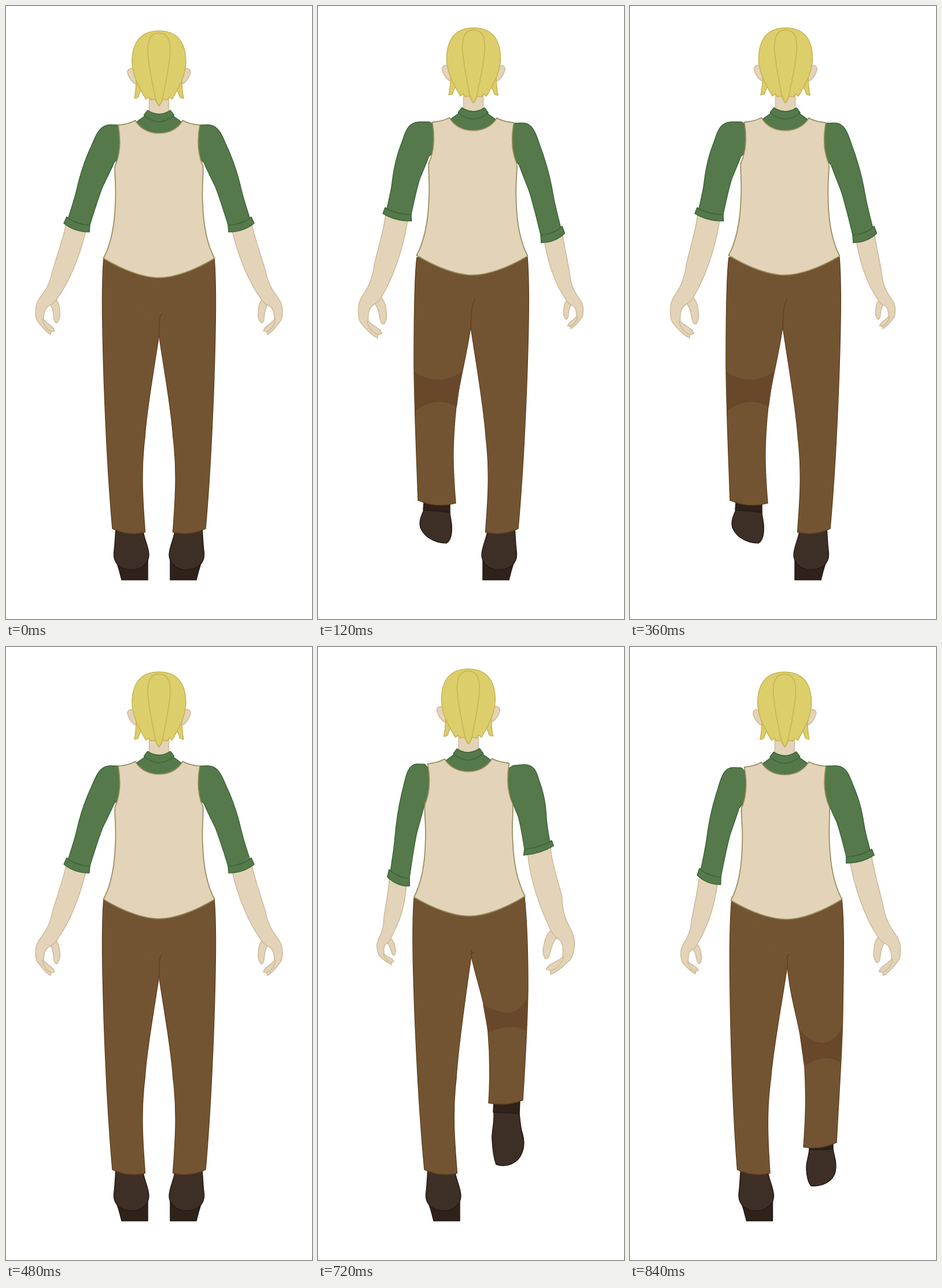
These frames come from a looping animation (529 by 1058 pixels, 960 ms). An HTML page:

```html
<!DOCTYPE html>
<html lang="en">
<head>
<meta charset="utf-8">
<title>Walk cycle from behind</title>
<style>
  html, body { margin: 0; width: 100%; height: 100%; overflow: hidden; background: #fff; }
  svg { display: block; width: 100vw; height: 100vh; stroke-width: 1.5; stroke-linejoin: round; stroke-linecap: round; }
  .skin { fill: #e3d3b8; stroke: #cfba98; }
  .hair { fill: #dbce6b; stroke: #c8b252; }
  .green { fill: #55794a; stroke: #3b6637; }
  .vest { fill: #e3d3b8; stroke: #958c5c; stroke-width: 1.7; }
  .pants { fill: #735432; stroke: #63421f; }
  .waist { fill: #735432; stroke: #735432; }
  .knee { fill: #68472b; }
  .boot { fill: #3e2f26; stroke: #241a14; }
  .sole { fill: #30221b; stroke: #241a14; }
  .line { fill: none; }
</style>
</head>
<body>
<svg id="stage" viewBox="0 0 529 1058" xmlns="http://www.w3.org/2000/svg"></svg>
<script>
const STEP = 120;
const MIRROR = 'transform="matrix(-1 0 0 1 529 0)"';
const stage = document.getElementById('stage');

// Arms: shoulder, cuff outer, cuff inner, wrist, fingertip (right arms are mirrored)
const restArm = [[178, 205], [105, 364], [145, 378], [71, 485], [77, 567]];

const poses = {
  stand: {
    head: [0, 0, 0], torso: [0, 0, 0], apex: [264.5, 568], fold: [270, 531],
    armL: restArm, armR: restArm,
    legL: { hip: 0, foot: 0 }, legR: { hip: 0, foot: 0 }
  },
  leftLow: {
    head: [4, -5.3, .3], torso: [2, -4.6, .4], apex: [264, 553], fold: [272, 506],
    armL: [[173, 200], [116, 348], [161, 360], [89, 479], [103, 573]],
    armR: [[172, 202], [107, 380], [144, 395], [86, 491], [92, 557]],
    legL: {
      hip: [171, 434],
      d: 'M171 434C166 470 166 560 166 622C167 700 169 740 173 853Q205 867 238 858C233 800 232 760 238 700C242 655 256 610 264 553',
      knee: 'M167 632Q207 658 248 632L240 692Q205 672 169 698Z',
      sole: 'M183 857L182 870Q205 871 228 874L228 860Z',
      boot: 'M183 870C176 885 175 892 177 900C183 915 200 927 222 927C230 922 232 910 231 895C230 885 228 880 228 874Q205 871 183 870Z'
    },
    legR: { hip: -2, foot: -1 }
  },
  leftHigh: {
    head: [11.7, -5.5, 1], torso: [2.5, -4.1, 2.1], apex: [262.5, 528], fold: [271, 491],
    armL: [[181, 197], [138, 317], [183, 331], [111, 473], [130, 582]],
    armR: [[160, 205], [117, 355], [160, 376], [105, 482], [130, 545]],
    legL: {
      hip: [173, 432],
      d: 'M173 432C168 470 163 540 163 600C163 640 158 690 161 770Q190 782 226 775C224 730 224 690 232 648C237 610 251 575 262.5 528',
      knee: 'M163 592Q205 614 243 594L233 645Q195 623 162 644Z',
      sole: 'M173 772L171 794Q195 797 216 801L216 776Z',
      boot: 'M171 794C165 815 162 830 163 845C164 872 184 888 209 888C217 880 220 855 218 840C217 825 216 815 216 801Q195 797 171 794Z'
    },
    legR: { hip: -2, foot: 1.5 }
  },
  rightLow: {
    head: [3, .2, -.2], torso: [6, 1, -.6], apex: [272, 550], fold: [276, 530],
    armL: [[176, 208], [120, 382], [157, 397], [101, 496], [113, 564]],
    armR: [[172, 205], [111, 349], [155, 362], [82, 477], [91, 567]],
    legL: { hip: 7, foot: 1.5 },
    legR: {
      hip: [366, 434],
      d: 'M366 434C371 480 369 560 368 620C368 680 363 740 357 855Q330 868 300 863C304 810 305 770 301 710C296 660 277 610 272 550',
      knee: 'M367 655C350 693 320 690 292 660L301 724Q335 699 363 717Z',
      sole: 'M309 860L310 867Q330 869 351 866L351 857Z',
      boot: 'M310 867C309 880 304 890 305 902C306 915 308 925 313 930C335 932 352 920 355 905C358 890 353 880 351 866Q330 869 310 867Z'
    }
  },
  rightHigh: {
    head: [-4.3, -5, -.2], torso: [-2.5, -4.6, -.5], apex: [265, 533], fold: [269, 527],
    armL: [[169, 202], [123, 384], [158, 399], [111, 489], [127, 548]],
    armR: [[172, 203], [125, 334], [172, 349], [102, 465], [127, 565]],
    legL: { hip: -3, foot: 0 },
    legR: {
      hip: [357, 432],
      d: 'M357 432C362 480 363 540 363 590C362 650 358 720 354 782Q325 793 295 787C298 740 297 700 294 665C290 615 275 580 265 533',
      knee: 'M361 606C345 640 315 635 285 616L294 666Q328 648 360 662Z',
      sole: 'M304 785L303 803Q326 804 348 805L349 783Z',
      boot: 'M304 803C305 825 300 835 301 850C302 870 305 885 308 893C325 899 346 892 353 872C358 860 356 848 353 838C350 830 349 815 348 805Q326 804 304 803Z'
    }
  }
};
const cycle = ['stand', 'leftLow', 'leftHigh', 'leftLow', 'stand', 'rightLow', 'rightHigh', 'rightLow'];

const path = (cls, d) => `<path class="${cls}" d="${d}"/>`;
const flip = (s) => `<g ${MIRROR}>${s}</g>`;
const both = (s) => s + flip(s);
const place = ([x, y, turn], cy, s) =>
  `<g transform="translate(${x} ${y}) rotate(${turn} 264.5 ${cy})">${s}</g>`;

// Moves every coordinate pair of a path string
const warp = (d, map) => d.replace(/(-?[\d.]+)[ ,](-?[\d.]+)/g, (m, x, y) =>
  map(+x, +y).map(v => v.toFixed(1)).join(' '));

// Affine map that carries triangle a onto triangle b
function affine(a, b) {
  const [[x0, y0], [x1, y1], [x2, y2]] = a;
  const ux = x1 - x0, uy = y1 - y0, vx = x2 - x0, vy = y2 - y0, det = ux * vy - vx * uy;
  return (x, y) => {
    const p = ((x - x0) * vy - (y - y0) * vx) / det;
    const q = ((y - y0) * ux - (x - x0) * uy) / det;
    return [0, 1].map(i => b[0][i] + p * (b[1][i] - b[0][i]) + q * (b[2][i] - b[0][i]));
  };
}

// Turn and scale that carries segment a onto segment b
function similar(a, b) {
  const third = ([[x0, y0], [x1, y1]]) => [[x0, y0], [x1, y1], [x0 - y1 + y0, y0 + x1 - x0]];
  return affine(third(a), third(b));
}

function arm(pts) {
  const up = affine(restArm.slice(0, 3), pts.slice(0, 3));
  const hand = similar(restArm.slice(3), pts.slice(3));
  const fore = warp('M105 372C102 390 95 410', up) +
    warp(' 80 458C78 470 74 479 71 485C65 497 54 506 52 518C50 532 51 538 54 543C60 550 66 561 77 567L78 562L84 561C82 552 72 550 65 541C65 528 68 519 77 516C82 522 82 532 83 540Q84 547 88 547Q94 540 93 530C93 518 91 512 87 507C108 478', hand) +
    warp(' 127 435 139 384Z', up);
  const lines = warp('M63 540Q66 557 78 562M77 516Q82 514 87 507', hand);
  const sleeve = warp('M203 212L196 205.5L180 205C160 205 154 228 147 243C132 275 126 300 122 318C118 335 112 352 107 368L144 381C150 362 158 335 167 312C174 297 182 282 187 270L203 255Z', up);
  const cuff = warp('M105 364Q122 378 145 378L144 390Q118 390 100 375Z', up);
  return path('skin', fore) + path('skin line', lines) + path('green', sleeve) + path('green', cuff);
}

// Standing leg, drawn as a left one: sheared between hip and foot shift
function standing({ hip, foot }, [ax, ay]) {
  const shear = (x, y) => [x + foot + (hip - foot) * Math.max(0, 902 - y) / 466, y];
  const leg = warp('M169 434C166 470 166 520 167.5 580C169 650 174 790 184 902Q212 915 240.5 908C236 850 233 800 240 745C243 695', shear) +
    ` ${ax - 9} ${ay + 62} ${ax} ${ay}`;
  const sole = warp('M190 955L196 975L200 990.5L245 990.5L245 955Z', shear);
  const boot = warp('M190 900L188 930L186.5 945C186 964 200 973 218 973C236 973 247 960 247 947C246 930 238 920 236 900Z', shear);
  return path('sole', sole) + path('boot', boot) + path('pants', leg);
}

const raised = (l) => path('sole', l.sole) + path('boot', l.boot) + path('pants', l.d) + path('knee', l.knee);

function legs({ legL, legR, apex, fold }) {
  const [ax, ay] = apex;
  const left = legL.d ? raised(legL) : standing(legL, apex);
  const right = legR.d ? raised(legR) : flip(standing(legR, [529 - ax, ay]));
  const hipL = legL.d ? legL.hip : [169 + legL.hip, 434];
  const hipR = legR.d ? legR.hip : [360 - legR.hip, 434];
  const crease = `M${apex}C${ax + 1} ${ay - 20} ${fold[0] - 6} ${fold[1] + 4} ${fold}`;
  return path('waist', `M${hipL}L${apex}L${hipR}Z`) + left + right + path('pants line', crease);
}

const vest = path('green', 'M226 200L241 189H288L303 200L290 221H239Z') +
  path('vest', 'M223.5 197.5C232 212 247 219.5 264.5 219.5C282 219.5 297 212 305.5 197.5C313 202 325 204.5 335 205.5C331 228 331 255 340.5 276C342 290 338 310 340 340C341 375 347 410 360.5 435.5C325 457 290 469 264.5 469C239 469 204 457 168.5 435.5C182 410 188 375 189 340C191 310 187 290 188.5 276C198 255 198 228 194 205.5C204 204.5 216 202 223.5 197.5Z');
const collar = path('green', 'M245 180Q264.5 193 284 180L290.5 188.5Q264.5 211 238.5 188.5Z');
const neck = path('skin', 'M247.5 150V184L256 190H273L281.5 184V150Z');
const head = both(path('skin', 'M222 109C213 105 208 111 211 118C214 127 220 134 226 135Z') +
    path('hair', 'M225 128C225 142 224 150 222 159Q227 159 229 156C230 150 233 145 237 142Z')) +
  path('hair', 'M264.5 43C238 43 218 57 218 97C219 124 232 143 242 161L247 157L250 162L258 161Q261 168 264.5 172.5Q268 168 271 161L279 162L282 157L287 161C297 143 310 124 311 97C311 57 291 43 264.5 43Z') +
  path('hair line', 'M264.5 172.5Q260 167 258 158C253 130 246 104 245 76C245 56 252 46.5 264.5 46.5C277 46.5 284 56 284 76C283 104 276 130 271 158Q269 167 264.5 172.5');

function draw(p) {
  stage.innerHTML = arm(p.armL) + flip(arm(p.armR)) + legs(p) +
    place(p.torso, 436, vest) + place(p.head, 185, neck) +
    place(p.torso, 436, collar) + place(p.head, 185, head);
}

const start = performance.now();
let shown = '';
function tick() {
  const name = cycle[Math.floor((performance.now() - start) / STEP) % cycle.length];
  if (name !== shown) draw(poses[shown = name]);
  requestAnimationFrame(tick);
}
tick();
</script>
</body>
</html>
```
